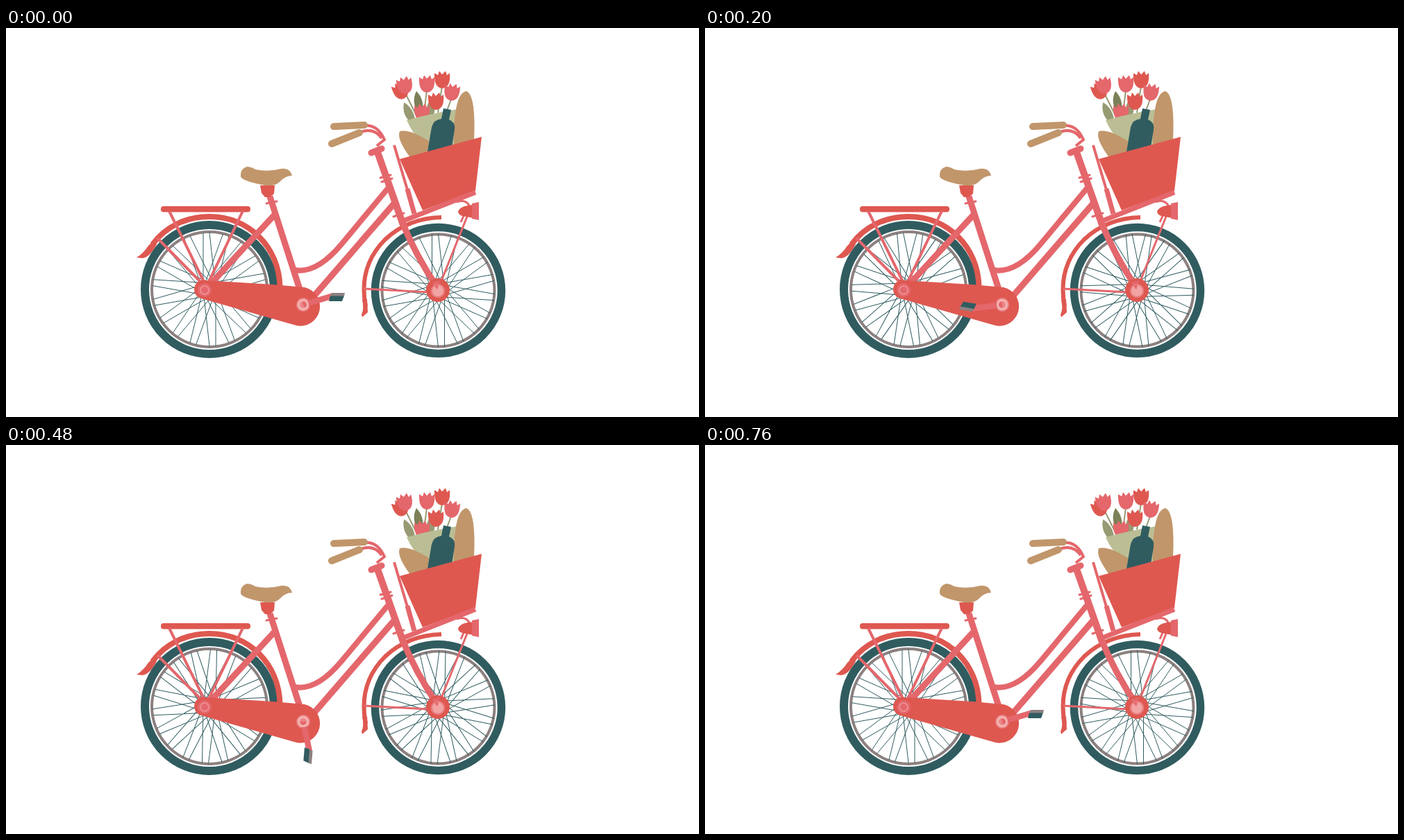
An HTML page that plays this animation: 998 px wide and 561 px high, repeating every 0.8 s.

```html
<!DOCTYPE html>
<html lang="en">
<head>
<meta charset="utf-8">
<title>Bicycle</title>
<style>
  html, body { margin: 0; width: 100%; height: 100%; overflow: hidden; background: #fff; }
  svg { display: block; width: 100%; height: 100%; }
  path, line, circle { fill: none; }
  .red { fill: #de5850; }
  .pink { fill: #e4676c; }
  .tan { fill: #c1966b; }
  .teal { fill: #305c60; }
  .pale { fill: #f2a3a3; }
  .red-line { stroke: #de5850; }
  .pink-line { stroke: #e4676c; }
  .tan-line { stroke: #c1966b; stroke-width: 10; stroke-linecap: round; }
  .spokes { stroke: #305c60; stroke-width: 1; }
  .tyre { stroke: #305c60; }
  .rim { stroke: #8c8080; stroke-width: 4; }
</style>
</head>
<body>
<svg viewBox="0 0 998 561">
  <defs>
    <path id="tulip" style="fill:inherit" d="M-11-9L-6-6L-4-12L0-7L5-12L7-6L11-9Q13 12 0 13Q-12 12-11-9Z"/>
    <path id="leaf" style="fill:inherit" d="M0 16Q-11 0-3-16Q9-4 6 16Z"/>
  </defs>

  <!-- wheels -->
  <g transform="translate(293 377)">
    <circle class="tyre" r="93" stroke-width="12"/>
    <circle class="rim" r="83"/>
    <path class="spokes"/>
  </g>
  <g transform="translate(622.5 378.5)">
    <circle class="tyre" r="91" stroke-width="11.5"/>
    <circle class="rim" r="81"/>
    <path class="spokes"/>
  </g>

  <!-- mudguards and rack -->
  <path class="red-line" stroke-width="8" d="M211 312C230 286 260 272 293 272C350 272 393 316 394.500 373"/>
  <path class="red" d="M188 331Q197 326 205 314L213 306L217 312Q207 331 196 332Z"/>
  <path class="red-line" stroke-width="6" d="M627 273C592 274 565 287 546 305C519 332 511 366 518 402"/>
  <path class="red" d="M513 392L520 391L521 410L513 417L512 413Q516 405 513 392Z"/>
  <rect class="red" x="223" y="257" width="129" height="8.500" rx="4"/>
  <path class="pink-line" stroke-width="4" d="M235 264L287 370M341 264L290 370M218 303L283 369"/>
  <path class="pink-line" stroke-width="3" d="M515 376L608 381M664 272L624 372"/>

  <!-- frame -->
  <g class="pink-line" stroke-width="9">
    <path d="M388 268L292 372M380 243L424 380M559 253L444 386"/>
    <path stroke-width="8" d="M551 230L483 312Q447 355 415 349"/>
    <path stroke-width="10" d="M535 179L572 284"/>
    <path stroke-width="9" d="M571 281Q590 328 621 374"/>
    <path stroke-width="3" stroke-linecap="round" d="M375 253L390 250M539 216L554 212M541 222L556 217M558 272L573 267"/>
    <path stroke-width="9" stroke-linecap="round" d="M526 180L541 174"/>
    <path stroke-width="4" d="M515 141Q535 138 545 161L534 170M511 150Q530 143 541 159"/>
    <path stroke-width="4" d="M559 169L580 240"/>
    <path stroke-width="7" d="M578 232L588 268"/>
  </g>
  <path class="red" d="M366 227H387L386 239L380 244H373L368 238Z"/>
  <path class="tan" d="M338 214Q337 203 347 200Q353 200 359 204Q377 208 396 203Q409 201 412 213Q402 213 394 222Q386 230 368 226Q339 220 338 214Z"/>
  <path class="tan-line" d="M472 142L516 140M469 167L509 151"/>

  <!-- bouquet, bread and bottle -->
  <path stroke="#979a72" stroke-width="2" d="M573 90L592 128M606 90L602 122M628 84L622 122M642 100L634 122"/>
  <g fill="#979a72">
    <use href="#leaf" transform="translate(580 122) rotate(-14)"/>
    <use href="#leaf" transform="translate(612 116) rotate(18)"/>
    <use href="#leaf" transform="translate(594 107)" fill="#7d8057"/>
  </g>
  <use href="#tulip" class="red" transform="translate(568 90) rotate(-18)"/>
  <use href="#tulip" class="pink" transform="translate(574 82) rotate(-10)"/>
  <use href="#tulip" class="pink" transform="translate(606 80)"/>
  <use href="#tulip" class="red" transform="translate(628 74)"/>
  <use href="#tulip" class="pink" transform="translate(642 92) rotate(8)"/>
  <use href="#tulip" class="pink" transform="translate(599 121)"/>
  <use href="#tulip" class="red" transform="translate(619 105)"/>
  <path style="fill:#bbbe94" d="M577 133Q602 126 628 121L651 117L648 168L605 172Q586 154 577 133Z"/>
  <path class="tan" d="M645 170Q644 94 663 91Q677 97 674 162Z"/>
  <path class="tan" d="M583 188Q562 160 567 149Q580 145 609 163L607 182Z"/>
  <path class="teal" d="M630 116L641 118L638 132Q648 136 646 147L641 178L606 184L613 143Q616 132 627 131Z"/>

  <!-- basket and lamp -->
  <path class="red" d="M567 189L685 157L676 235L600 263Z"/>
  <path class="pink-line" stroke-width="7" d="M570 279L676 237"/>
  <path class="pink-line" stroke-width="3" d="M649 251Q663 246 668 258M659 271L655 280"/>
  <path class="red" d="M651 265Q653 258 665 256L673 255V274L662 272Q652 271 651 265Z"/>
  <path class="pink" d="M671 253L681 251V277L671 275Z"/>

  <!-- hubs and chain case -->
  <path class="red" d="M288 364L385 370L430 374A28 28 0 0 1 418 429L281 390A13 13 0 0 1 288 364Z"/>
  <circle class="pink" cx="286" cy="378" r="10"/>
  <circle cx="286" cy="378" r="6" stroke="#ee8d8e" stroke-width="2"/>
  <circle class="red" cx="622" cy="378" r="17"/>
  <circle class="pale" cx="622" cy="379" r="10"/>
  <path class="pink" d="M613 367L625 364L621 377Z"/>
  <circle cx="622" cy="379" r="9" stroke="#e97c7e" stroke-width="2"/>

  <!-- crank -->
  <circle style="fill:#ec8587" cx="428" cy="399" r="10"/>
  <g id="crank">
    <path class="pink-line" stroke-width="8.500" d="M428 399L470 386.500"/>
    <path class="teal" d="M467 386H487L484 394H465Z"/>
    <path style="fill:#8c8080" d="M469 382H488L487 386.500H467Z"/>
  </g>
  <circle cx="428" cy="399" r="6.500" stroke="#f4b4b2" stroke-width="3"/>
</svg>
<script>
  const STEP = 40, STEPS = 19, LOOP = 800;
  const spokes = document.querySelectorAll('.spokes');
  const crank = document.getElementById('crank');

  // Nine-pixel tangents to the hub, leaning alternately each way.
  function spokePath() {
    const point = (radius, angle) =>
      `${(radius * Math.cos(angle)).toFixed(1)} ${(radius * Math.sin(angle)).toFixed(1)}`;
    const lean = Math.acos(9 / 82);
    let path = '';
    for (let i = 0; i < 18; i++) {
      const angle = i * Math.PI / 9 - Math.PI / 2;
      const other = angle - 0.11;
      path += `M${point(82, angle)}L${point(9, angle + lean)}`;
      path += `M${point(82, other)}L${point(9, other - lean)}`;
    }
    return path;
  }

  spokes.forEach(wheel => wheel.setAttribute('d', spokePath()));

  function draw(now) {
    const step = Math.floor(now % LOOP / STEP);
    const turn = 360 * step / STEPS;
    crank.setAttribute('transform', `rotate(${2 * turn} 428 399)`);
    spokes.forEach(wheel => wheel.setAttribute('transform', `rotate(${turn})`));
    requestAnimationFrame(draw);
  }
  draw(0);
</script>
</body>
</html>
```
